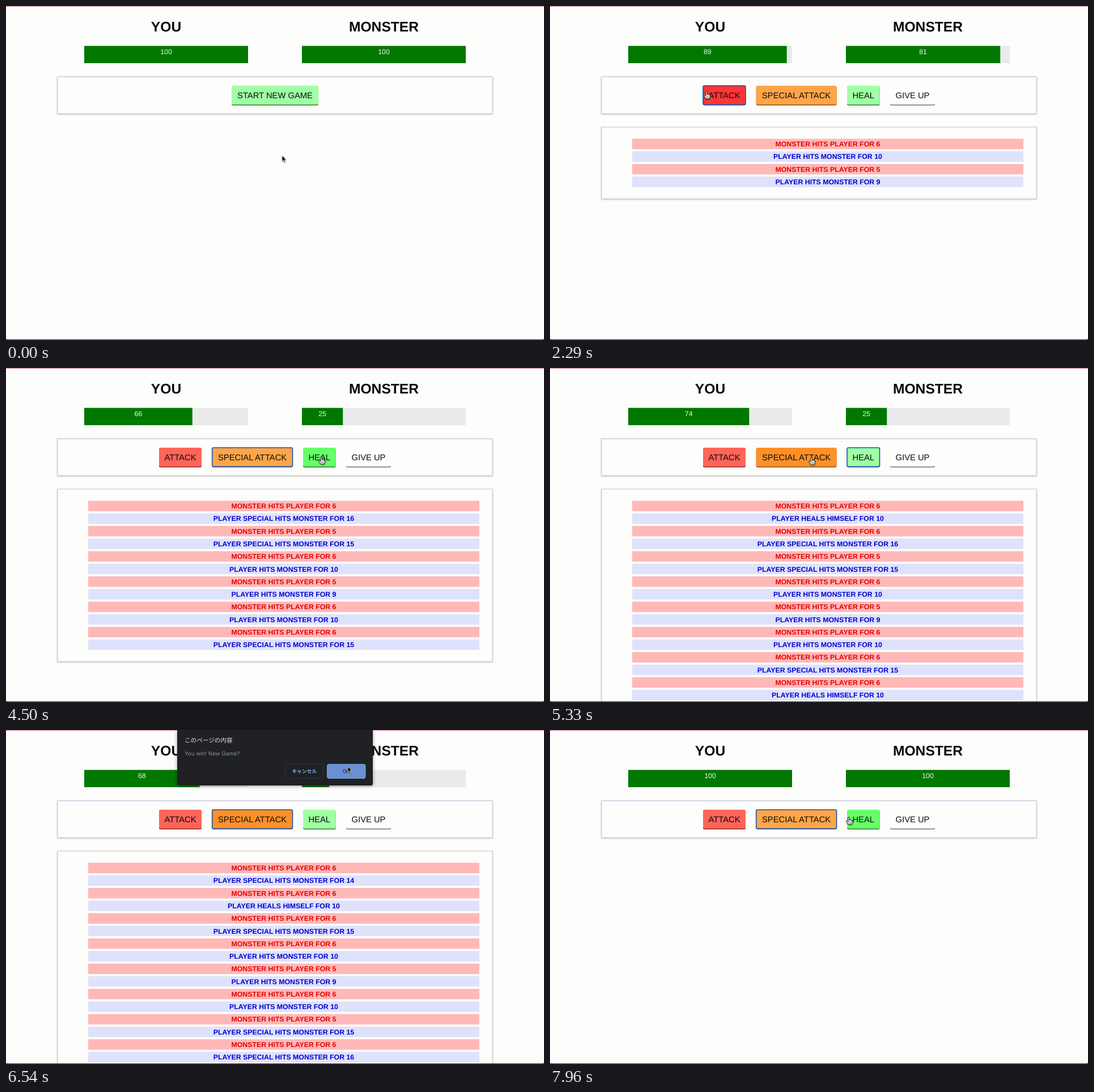
Animation, 949 px wide and 590 px high, one loop 8 s. Source, as an HTML page:

```html
<!DOCTYPE html>
<html lang="en">
<head>
<meta charset="utf-8">
<title>Monster game</title>
<style>
  html, body { margin: 0; width: 100%; height: 100%; overflow: hidden; background: #fdfdfb; }
  svg { display: block; width: 100vw; height: 100vh; text-rendering: geometricPrecision; }
  text { font-family: "Liberation Sans", Arial, sans-serif; }
  .mid { text-anchor: middle; }
  .title { font-size: 24.64px; font-weight: bold; fill: #0a0a0e; }
  .count { font-size: 12.32px; fill: #f2f7f2; }
  .label { font-size: 14.77px; fill: #0c0c0c; }
  .row { font-size: 12.32px; font-weight: bold; }
  .panel { fill: #fdfdfb; stroke: #cacad2; filter: drop-shadow(0 1.5px 1.5px rgba(0, 0, 0, .24)); }
  .cjk { font-family: "Noto Sans CJK JP", "Noto Sans CJK", sans-serif; }
  .ui { font-family: Inter, sans-serif; }
</style>
</head>
<body>
<svg id="stage" viewBox="0 0 949 590" preserveAspectRatio="none"></svg>
<script>
const LOOP = 8000, FADE = 500;
const START = 1150, OPEN = 5922, CLOSE = 7160;
const ROW_Y = 234.5, ROW_STEP = 22.27;

// time, player action, amount, monster's answer
const HIT = 'HITS MONSTER', SPECIAL = 'SPECIAL HITS MONSTER', HEAL = 'HEALS HIMSELF';
const turns = [
  [2100, HIT, 9, 5], [2285, HIT, 10, 6], [2520, HIT, 10, 6],
  [3272, SPECIAL, 15, 5], [3560, SPECIAL, 15, 6], [3790, SPECIAL, 16, 6],
  [4690, HEAL, 10, 6], [4960, HEAL, 10, 6], [5750, SPECIAL, 14, 6]
].map(([at, act, amount, hurt]) => ({ at, act, amount, hurt }));

let you = 100, monster = 100;
for (const turn of turns) {
  if (turn.act === HEAL) you += turn.amount;
  else monster -= turn.amount;
  you -= turn.hurt;
  Object.assign(turn, { you, monster });
}
const reset = { at: OPEN, you: 100, monster: 100 };

// time, x, y of the pointer
const path = [
  [0, 487, 264], [300, 487, 264], [850, 478, 160], [1250, 478, 160],
  [1950, 276, 151], [2620, 276, 151], [3150, 451, 160], [3900, 451, 160],
  [4380, 556, 157], [5000, 556, 157], [5310, 461, 158], [6020, 461, 158],
  [6480, 603, 64], [7230, 603, 64], [7880, 527, 154], [8000, 527, 154]
];

const svg = document.getElementById('stage');
function add(parent, tag, attrs, text) {
  const el = document.createElementNS('http://www.w3.org/2000/svg', tag);
  set(el, attrs);
  if (text) el.textContent = text;
  parent.appendChild(el);
  return el;
}
function set(el, attrs) {
  for (const k in attrs) el.setAttribute(k, attrs[k]);
}
const rect = (p, x, y, width, height, attrs) => add(p, 'rect', { x, y, width, height, ...attrs });
const label = (p, x, y, cls, text, attrs) => add(p, 'text', { x, y, class: cls, ...attrs }, text);
const show = (el, on) => el.setAttribute('visibility', on ? 'visible' : 'hidden');

function makeBar(x, title, key) {
  label(svg, x + 144.5, 45, 'title mid', title);
  rect(svg, x, 70.5, 289, 30.5, { fill: '#eaeaea' });
  const fill = rect(svg, x, 70.5, 289, 30.5, { fill: '#007800' });
  return { x, key, fill, text: label(svg, 0, 84.6, 'count mid', '100') };
}

function makeButton(x, w, text, color, hover, edge, from, to) {
  const g = add(svg, 'g', {});
  rect(g, x, 142, w, 33.6, { rx: 2.5, fill: edge });
  const face = rect(g, x, 140.7, w, 33.6, { rx: 2.5 });
  label(g, x + w / 2, 163, 'label mid', text);
  return { g, face, x, w, color, hover, from, to };
}

rect(svg, 0, 0, 949, 590, { fill: '#fdfdfb' });
const bars = [makeBar(138, 'YOU', 'you'), makeBar(522, 'MONSTER', 'monster')];

rect(svg, 91, 125, 767, 65, { class: 'panel' });
add(svg, 'path', { d: 'M91 125H858', stroke: '#cfcfec' });
const logPanel = rect(svg, 91, 214, 767, 10, { class: 'panel' });

const buttons = [
  makeButton(398, 153, 'START NEW GAME', '#a0ffa4', '#66ff68', '#1d5a1d', -1, START),
  makeButton(270, 75, 'ATTACK', '#ff6459', '#ff3636', '#7a1410', START, LOOP),
  makeButton(363.7, 141.8, 'SPECIAL ATTACK', '#ffa548', '#ff9028', '#6b3d08', START, LOOP),
  makeButton(524, 57.5, 'HEAL', '#a0ffa4', '#66ff68', '#1d5a1d', START, LOOP),
  makeButton(600, 79, 'GIVE UP', '#fefefc', '#f4f4f2', '#55554f', START, LOOP)
];
const [startBtn, attackBtn, specialBtn, healBtn] = buttons;
const buttonFor = { [HIT]: attackBtn, [SPECIAL]: specialBtn, [HEAL]: healBtn };

const rows = [];
for (let i = 0; i < turns.length * 2; i++) {
  const y = ROW_Y + i * ROW_STEP, foe = i % 2 === 0;
  const g = add(svg, 'g', {});
  rect(g, 145, y, 690, 18.5, { fill: foe ? '#ffb8b8' : '#dfe2fb' });
  const text = label(g, 490, y + 13.7, 'row mid', '', { fill: foe ? '#e60000' : '#0000d2' });
  rows.push({ g, text });
}

// window edges
rect(svg, 0, 0, 949, 1, { fill: '#c4738f' });
add(svg, 'path', { d: 'M0 587Q0 589 3 589H946Q949 589 949 587V590H0Z', fill: '#26263a' });

const dialog = add(svg, 'g', { style: 'filter:drop-shadow(0 1px 3px rgba(0,0,0,.4))' });
add(dialog, 'path', { d: 'M302 0H647V95Q647 98 644 98H305Q302 98 302 95Z', fill: '#1f2124' });
label(dialog, 315, 22, 'cjk', 'このページの内容', { 'font-size': 10.6, fill: '#e6e7e9' });
label(dialog, 315, 44.6, 'ui', 'You win! New Game?', { 'font-size': 9.75, fill: '#8d9094' });
rect(dialog, 493, 60.5, 67, 25, { rx: 3, fill: 'none', stroke: '#303338' });
label(dialog, 526.3, 76.2, 'cjk mid', 'キャンセル', { 'font-size': 8.7, 'font-weight': 700, fill: '#7fa9ee' });
rect(dialog, 566.5, 60.5, 67.5, 25, { rx: 3, fill: '#6b8fd3', stroke: '#7da2e4' });
label(dialog, 600.2, 76.2, 'ui mid', 'OK', { 'font-size': 9, 'font-weight': 500, fill: '#1f2a40' });

const pointer = add(svg, 'g', { style: 'filter:drop-shadow(0 1px .8px rgba(0,0,0,.35))' });
const arrow = add(pointer, 'path', {
  d: 'M0 0V10.6L2.4 8.4L4 12.2L5.8 11.4L4.2 7.7H7.5Z',
  fill: '#000', stroke: '#fff', 'stroke-width': .8
});
const hand = add(pointer, 'g', { 'stroke-linejoin': 'round', 'stroke-linecap': 'round', stroke: '#000', 'stroke-width': .9 });
add(hand, 'path', {
  d: 'M-1.2 1Q-1 -.3 0 -.3T1.2 1V4.6Q2.6 3.6 3.4 5Q4.8 4.2 5.3 5.7Q6.7 5.3 6.7 7V9.2Q6.2 10.8 5.5 13H-.7Q-1.4 11 -4 8.2Q-5 6.6 -3.6 6.3Q-2.5 6.2 -1.2 8Z',
  fill: '#fff'
});
add(hand, 'path', { d: 'M1.2 4.8V6.6M3.4 5.2V6.8M5.3 5.9V7.2M.7 8.8V11.2M2.5 8.8V11.2M4.3 8.8V11.2', 'stroke-width': .6 });

// CSS "ease": cubic-bezier(.25, .1, .25, 1)
function ease(x) {
  if (x <= 0) return 0;
  if (x >= 1) return 1;
  const curve = (a, b, s) => 3 * a * s * (1 - s) ** 2 + 3 * b * s * s * (1 - s) + s ** 3;
  let lo = 0, hi = 1;
  for (let i = 0; i < 24; i++) {
    const s = (lo + hi) / 2;
    if (curve(.25, .25, s) < x) lo = s; else hi = s;
  }
  return curve(.1, 1, lo);
}

function pointerAt(t) {
  const i = Math.max(1, path.findIndex(p => p[0] > t));
  const [t0, x0, y0] = path[i - 1], [t1, x1, y1] = path[i];
  const u = (t - t0) / (t1 - t0), s = u * u * (3 - 2 * u);
  return { x: x0 + (x1 - x0) * s, y: y0 + (y1 - y0) * s };
}

function level(events, key, t) {
  let from = 100, to = 100, t0 = 0;
  const at = s => from + (to - from) * ease((s - t0) / FADE);
  for (const e of events) {
    from = at(e.at);
    to = e[key];
    t0 = e.at;
  }
  return at(t);
}

function render(t) {
  const asking = t >= OPEN && t < CLOSE, over = t >= CLOSE;
  // the page stands still while the dialog is open
  const page = over ? OPEN + t - CLOSE : Math.min(t, OPEN);
  const done = turns.filter(turn => turn.at <= page);
  const events = over ? [...done, reset] : done;
  const last = events[events.length - 1] || reset;

  for (const bar of bars) {
    const width = 2.89 * level(events, bar.key, page);
    set(bar.fill, { width });
    set(bar.text, { x: bar.x + width / 2 });
    bar.text.textContent = last[bar.key];
  }

  // every update flips the whole list
  const log = [];
  if (!over) for (const turn of done) { log.push(turn); log.reverse(); }
  rows.forEach(({ g, text }, i) => {
    const turn = log[i >> 1];
    show(g, turn);
    if (turn) text.textContent = i % 2
      ? `PLAYER ${turn.act} FOR ${turn.amount}`
      : `MONSTER HITS PLAYER FOR ${turn.hurt}`;
  });
  show(logPanel, log.length);
  set(logPanel, { height: 37.3 + log.length * 2 * ROW_STEP });

  const cursor = pointerAt(t), spot = asking ? pointerAt(OPEN) : cursor;
  const focus = done.length ? buttonFor[done[done.length - 1].act] : null;
  let over1 = false;
  for (const b of buttons) {
    const live = t >= b.from && t < b.to;
    const hot = live && spot.x >= b.x && spot.x <= b.x + b.w && spot.y >= 141 && spot.y <= 175;
    over1 = over1 || hot;
    show(b.g, live);
    set(b.face, {
      fill: hot ? b.hover : b.color,
      stroke: b === focus ? '#1556b4' : 'none',
      'stroke-width': 1.6
    });
  }

  show(dialog, asking);
  set(pointer, { transform: `translate(${cursor.x} ${cursor.y})` });
  show(hand, over1 && !asking);
  show(arrow, !over1 || asking);
}

const begin = performance.now();
function tick() {
  render((performance.now() - begin) % LOOP);
  requestAnimationFrame(tick);
}
tick();
</script>
</body>
</html>
```
